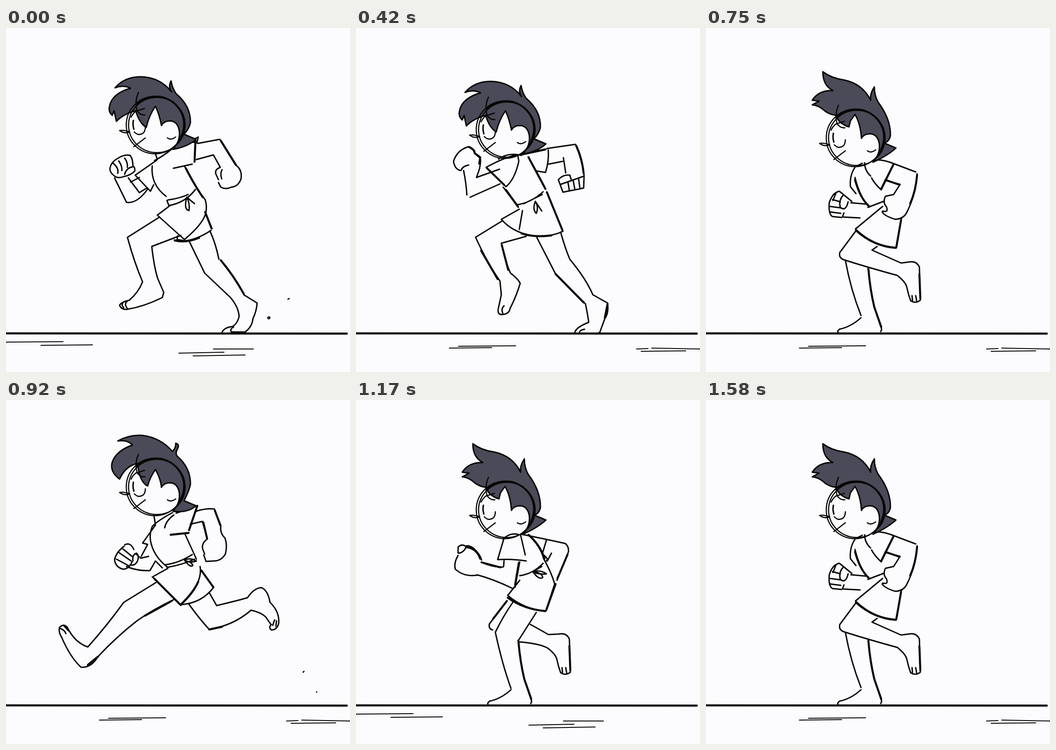
Animation, 748 px wide and 748 px high, one loop 1.68 s. Source, as an HTML page with a canvas:

```html
<!DOCTYPE html>
<html>
<head>
<meta charset="utf-8">
<title>Run cycle</title>
<style>
html, body { margin: 0; height: 100%; overflow: hidden; background: #fcfcff; }
canvas { display: block; }
</style>
</head>
<body>
<canvas id="stage" width="748" height="748"></canvas>
<script>
const ctx = document.getElementById('stage').getContext('2d');
const PAPER = '#fcfcff', INK = '#060705', HAIR = '#4b4a58';

// Head, drawn at the push-off height and shifted vertically per pose
const hairBack = tailY => `Q402 170 401 206Q398 220 387 ${tailY - 11}L413 ${tailY}Q396 ${tailY + 16} 363 264Q379 246 377 225Q374 203 357 202Q343 202 338 212Z`;
const tailY = { push: 242, flight: 252, contact: 242, passing: 233 };
const hair = {
  push: 'M338 212Q334 190 325 170Q311 190 305 216Q290 207 282 180Q255 187 240 203L235 180L231 190Q222 182 225 170Q231 142 271 131Q255 123 237 130Q258 106 293 106Q335 107 360 139Q352 128 359 115Q361 130 370 143',
  flight: 'M338 212Q337 195 325 173Q313 190 308 209Q290 200 286 160Q260 165 247 194Q225 178 231 157Q240 132 275 120Q265 108 243 111Q268 97 297 99Q336 104 362 134Q370 125 369 116Q377 118 374 126Q367 138 372 144',
  contact: 'M338 212Q336 190 324 163Q313 175 309 199Q290 185 283 153Q258 154 240 173Q222 156 231 136Q243 111 279 111Q265 100 244 101Q265 91 295 92Q335 98 361 130Q356 115 365 103Q365 120 372 135',
  passing: 'M338 212Q336 180 324 160L314 174L311 187Q288 180 283 162Q268 160 258 152Q245 140 231 139L246 131L231 129Q245 107 276 108Q254 97 254 67Q272 81 300 85Q340 93 358 129Q356 115 366 100Q366 118 374 133'
};
const face = 'M247 223Q256 221 269 226Q258 231 247 223M279 226Q288 236 299 228Q303 223 303 215M278 258L303 239M272 194Q275 187 282 181L301 175M288 140Q279 160 285 180Q292 190 302 189M351 239Q358 245 369 237';

const legs = {
  pushA: {
    line: 'M334 411L266 454M264 455Q279 510 297 552Q288 575 268 592Q250 596 247 603Q250 612 262 612Q300 606 340 586L343 575L330 545Q322 520 317 475L380 451M263 595Q256 600 264 610M254 598Q250 603 256 608M399 465L432 533L487 585Q505 605 507 627Q503 643 493 649Q475 651 470 661M495 650Q486 655 490 661L520 661Q535 650 537 632Q545 615 546 598L517 580M443 441Q455 465 463 503',
    bold: 'M467 505Q494 537 517 578'
  },
  flight: {
    line: 'M326 397L256 440Q220 490 178 537Q150 528 133 494Q125 485 116 495Q114 505 121 516Q140 560 163 581Q185 583 200 558Q240 515 285 480Q320 455 367 433M118 497Q128 500 130 508M125 490L136 502M442 419L458 447Q500 437 525 430Q540 408 556 408Q570 415 574 440Q595 460 593 485Q590 500 577 500Q570 495 577 488M397 443Q420 475 442 499Q495 490 533 457Q555 462 565 472L576 488M580 490L584 478M587 492L588 480',
    bold: 'M178 576L200 558M302 469L360 437M442 499L470 493'
  },
  contactA: {
    line: 'M316 417L215 545L190 573Q165 565 152 552Q140 537 130 544Q127 555 140 570Q165 605 192 628Q203 625 208 610L360 450M136 546L140 552M143 545L148 554M428 429L440 466L516 449Q530 428 546 427Q560 435 566 450L596 488Q597 503 588 506Q575 498 558 486Q540 480 523 479Q470 510 422 523L381 456M585 490L588 497',
    bold: 'M428 429L440 464M191 572L212 546M205 616L216 599M566 450L590 483'
  },
  contactB: {
    line: 'M310 427L215 545L190 573Q165 565 152 552Q140 537 130 544Q127 555 140 570Q165 605 192 629M204 622L215 602L356 455M136 546L140 552M143 545L148 554M434 436L446 469L510 445Q525 425 540 424Q552 430 560 445L598 483Q600 497 590 502Q575 490 562 480L522 471L468 508Q440 530 430 532L384 460M585 488L590 495',
    bold: 'M384 460L426 525M191 572L212 546M430 531L466 509'
  },
  down: {
    line: 'M318 442Q280 490 258 520Q245 570 232 625Q210 645 190 652L188 661M272 661Q278 650 275 635Q290 570 305 535L362 475M425 452L432 480Q470 490 495 490Q520 475 530 482L555 560Q550 572 540 568L520 525Q500 520 490 523Q430 540 385 535L372 478M544 566L546 555',
    bold: 'M530 484L553 552'
  },
  passA: {
    line: 'M341 440Q320 470 303 505Q318 575 337 627M337 630Q315 650 290 655Q285 660 287 661M392 462L353 523Q357 570 366 607L382 655L380 660M328 437L290 487Q288 498 297 500M379 488Q405 502 418 510L440 509Q458 505 464 520L466 590M356 526Q400 530 416 539Q435 553 437 565Q440 580 445 593Q455 600 466 592M449 593L448 582M458 593L456 582',
    bold: 'M353 523Q357 570 366 607L381 650M328 437L298 476M464 535L466 588'
  },
  passB: {
    line: 'M303 505Q315 570 337 625M337 630Q315 650 290 655Q285 660 287 661M353 523Q357 570 366 607L382 655L380 660M326 441L291 488Q288 500 300 504Q350 520 416 538Q435 553 437 565Q440 580 445 593Q455 600 466 592M372 475L361 483L424 511L440 509Q458 505 464 520L466 590M449 593L448 582M458 593L456 582',
    bold: 'M353 523Q357 570 366 607L381 650M464 535L466 588'
  },
  pushB: {
    line: 'M317 420L260 455Q285 510 313 550L316 580L309 612Q308 624 318 623Q333 622 335 610Q350 580 357 555Q352 545 336 533Q325 510 316 468L370 453M319 620Q315 610 322 604M393 455L433 533L499 600Q505 630 506 640Q480 650 476 661M497 655Q486 657 486 662M445 444Q455 480 465 503Q500 545 515 580L547 598Q550 620 541 632L530 662L522 665',
    bold: 'M317 472L331 526M272 484L308 546M434 535L495 597M547 600L541 630'
  }
};

const body = {
  pushA: {
    line: 'M325 273L329 286M362 262Q340 280 323 288M318 300Q314 340 348 366M327 288L281 320L314 355L321 341M236 326L262 379Q285 383 309 349M266 326L290 358L306 348M271 335L290 325M239 324Q225 315 226 305Q228 292 242 284Q258 274 270 277Q276 285 276 300Q281 303 280 311Q272 320 256 323Q248 327 239 324M233 294Q246 305 243 316M245 289Q253 300 252 310M258 283Q265 292 264 303M258 318Q262 304 275 302M380 251L411 248M412 240L418 237L415 250M364 305L405 296M417 251L465 242L502 300Q514 310 511 328Q505 345 490 346Q478 352 467 346L462 336M414 286L451 276L466 303Q452 308 457 319L462 330M470 308Q465 315 469 328M389 302Q410 345 433 373Q437 385 435 400Q430 425 388 460M329 407L388 460M329 407L358 385M350 375L354 386Q390 380 412 351M352 374Q380 370 396 362M393 368Q386 395 398 397Q400 380 393 368L410 382M433 400L448 436M366 461Q400 470 446 440M373 452L372 460L385 462',
    bold: 'M412 242L410 291M391 305Q412 345 428 368M433 400L447 436M367 462Q392 468 420 456M467 245L500 298'
  },
  flight: {
    line: 'M322 253L325 272L297 311L308 314L294 340M257 318Q240 330 236 347Q238 364 255 368Q268 367 274 352M258 315Q270 308 278 325M246 332L272 350M240 346L266 360M252 322L274 340M276 350Q274 336 284 333Q290 340 286 350Q280 362 270 358M283 335L293 344L310 340M262 362Q285 372 313 371L325 350M318 275Q312 290 314 305Q320 340 352 364M362 245Q330 262 318 275M345 278Q348 262 365 250M370 246L410 232M358 293L397 289M413 242Q435 235 453 237Q460 255 467 273Q465 290 476 300Q482 315 477 335Q468 350 452 350L435 351L430 337M401 270L427 264L438 302Q424 312 428 325L432 335M389 291L414 346M422 362Q425 375 418 395Q408 420 380 445M320 386L380 446M318 385L352 366M325 350L340 365M347 358Q375 355 405 336M350 364Q385 358 410 346M388 348Q400 342 414 350Q400 355 388 348Q400 365 406 360Q405 352 390 350M425 370L451 408Q425 442 380 445',
    bold: 'M416 230L398 283M358 293L397 289M425 371L451 407M418 395Q408 418 382 443M454 240L466 272M429 266L437 300M322 388L380 446'
  },
  contactA: {
    line: 'M322 265L324 277M326 272Q308 290 308 320Q315 350 328 384M336 299Q330 275 345 265Q375 260 412 268L375 317L345 300M411 268L399 289M378 316L406 328M400 289L444 318L413 383M407 325L386 360L366 364Q354 378 355 395Q362 407 375 410Q395 415 405 405L412 385M337 381Q370 372 388 347M385 320L392 345M300 397L330 385L353 379M298 398L362 455M405 408L365 448M415 384L441 407Q420 440 370 458M292 376Q300 363 320 364L325 370L327 382M300 372L315 372L315 390M292 376Q290 385 300 388L313 386M297 390L303 398',
    bold: 'M309 298Q306 312 312 325M443 320L414 380M400 289L420 302M405 408L389 432M315 413L352 448M418 386L440 407'
  },
  passA: {
    line: 'M360 292Q410 302 455 312Q463 318 462 330L437 392M414 305L405 335Q420 345 414 350M425 333L416 350M375 293Q400 315 408 345Q425 375 432 400L413 458M322 300L308 347Q340 345 370 350M358 294L368 337M320 303Q333 288 352 292M356 352L346 407M322 348L321 362M273 353Q300 365 320 363M263 380Q300 390 341 410M273 348Q270 335 255 322Q245 315 238 318Q230 312 222 320L222 333Q233 333 239 321M222 338Q212 355 216 368Q235 385 263 381M356 382Q385 378 407 355M385 373L404 362M385 374Q400 368 414 378Q400 380 385 374Q398 392 406 386Q405 377 390 374M330 425L356 392M330 425Q365 455 412 459',
    bold: 'M375 293Q400 315 410 345M434 400L414 456M330 430Q365 455 412 459M460 336L438 388M354 354L346 402M240 320Q262 322 270 345M273 353L314 364'
  },
  pushB: {
    line: 'M415 262L477 253Q492 285 496 321M419 296L449 290M451 282L456 315M418 265Q420 290 412 314L393 311M440 330Q450 318 465 320L468 330M440 330L450 357L495 348L496 322L445 340M461 336L464 354M472 330L476 352M484 327L487 350M283 303L326 345Q345 330 354 290L352 278M283 303Q325 280 350 276M262 325L312 307M248 368L313 339M234 310Q240 340 241 363M262 325L269 305M269 303Q272 290 270 280L258 272Q252 258 245 258Q220 265 212 290Q215 308 228 310Q232 300 245 298M310 285Q330 270 360 277M375 280L410 345M415 357L450 442M320 346L353 390M352 384Q380 380 407 356M365 382L405 362M390 377Q383 395 392 403Q398 390 390 377L404 398M316 416L355 394M316 416Q345 450 400 453Q430 452 450 442M362 397L355 438',
    bold: 'M375 281L412 350M415 357L449 440M479 256Q492 285 495 316M285 305L322 341M360 447Q390 456 425 451M326 352L352 388M360 275L412 264M246 259Q258 264 258 272L270 282L268 295'
  },
  contactB: {
    line: 'M330 268Q310 290 314 325Q318 345 330 352M328 270Q332 290 317 327M317 328L369 325M336 330L339 352M330 270Q345 263 360 268L377 322M366 270L400 346M360 266L400 293L390 308M400 297Q430 312 434 325Q425 345 413 357M371 324L379 377M313 361L341 354M314 400L378 378M313 361Q300 350 280 354Q262 360 262 372M266 382Q266 400 276 406Q295 412 315 398M381 360Q385 345 398 349Q390 355 381 360L405 350M404 350L423 374M428 379L465 401Q430 450 375 457M354 400L373 456M298 412Q325 445 358 454L366 443M298 410L318 402',
    bold: 'M358 270L377 320M314 292Q310 308 315 320M318 328L366 326M371 328L378 374M300 414Q325 442 356 454M404 350L422 372M270 357L300 354'
  },
  passB: {
    line: 'M324 303Q312 320 314 345L326 360M328 300L340 294M324 325Q335 370 356 389M345 293Q345 310 358 322M365 287Q385 285 411 296L456 313M407 298L381 352Q366 338 360 326M459 317Q455 365 437 400Q430 415 412 416Q390 410 383 400M384 398Q398 402 392 388Q384 380 390 366L408 362L422 340L389 331M268 380Q275 358 290 355L317 377M268 380Q266 405 275 410L295 412M283 358L276 375M275 373L292 378M270 388L292 391M270 400L293 403M298 364Q288 375 292 390Q304 400 309 378M315 380L349 383M298 411L335 413M300 402L297 410M352 390L386 377M384 388L325 437Q365 475 413 478L425 415',
    bold: 'M407 298L381 350M326 440Q365 475 413 478M459 320Q456 355 444 382M424 418L414 476M324 330Q335 370 354 387M392 331L421 341'
  }
};

// One full stride: [head shift, hair, legs, body, body shift, dust]
const stride = [
  [0, 'push', 'pushA', 'pushA', 0, 'M569 630Q573 626 574 630Q571 635 569 630M613 590L616 588'],
  [-22, 'flight', 'flight', 'flight', 0, 'M646 592L648 590M675 635L676 635'],
  [-7, 'contact', 'contactA', 'contactA', 0, ''],
  [20, 'passing', 'down', 'contactA', 25, ''],
  [28, 'passing', 'passA', 'passA', 0, ''],
  [10, 'push', 'pushB', 'pushB', 0, ''],
  [-12, 'flight', 'flight', 'pushB', -20, ''],
  [-5, 'contact', 'contactB', 'contactB', 0, 'M467 660L484 661M629 653L630 653'],
  [20, 'passing', 'down', 'contactB', 24, ''],
  [28, 'passing', 'passB', 'passB', 0, '']
];
const dashes = [
  'M0 683L124 682M76 690L188 689M376 707L474 705M451 698L538 698M407 713L520 711',
  'M203 696L295 695M223 692L347 691M610 698L635 697M643 696L748 698M620 703L717 702'
];

const LOOP = 1680;
const starts = Array.from({ length: 20 }, (_, i) => 10 * Math.round(i * 25 / 3));

function stroke(path, width) {
  ctx.lineWidth = width;
  ctx.stroke(new Path2D(path));
}

function drawPart({ line, bold }, dy = 0) {
  ctx.save();
  ctx.translate(0, dy);
  stroke(line, 3);
  stroke(bold, 4.4);
  ctx.restore();
}

function ellipse(x, y, rx, ry, width) {
  ctx.lineWidth = width;
  ctx.beginPath();
  ctx.ellipse(x, y, rx, ry, 0, 0, 2 * Math.PI);
  ctx.stroke();
}

function drawHead(dy, style) {
  const shape = hair[style] + hairBack(tailY[style]);
  ctx.save();
  ctx.translate(0, dy);
  ctx.fillStyle = HAIR;
  ctx.fill(new Path2D(shape));
  stroke(shape, 3);
  ellipse(324, 211, 62.5, 62.5, 2.5);
  ellipse(328, 211, 61.5, 60, 2.5);
  stroke('M283 166Q310 145 340 150Q378 162 387 198Q389 220 379 240', 3.6);
  stroke(face, 2.6);
  stroke('M277 201Q275 210 278 220', 3.2);
  ctx.restore();
}

function draw(time) {
  const t = time % LOOP;
  const step = starts.findLastIndex(s => s <= t);
  const [headY, style, leg, torso, torsoY, dust] = stride[step % 10];
  ctx.fillStyle = PAPER;
  ctx.fillRect(0, 0, 748, 748);
  ctx.strokeStyle = INK;
  ctx.lineCap = ctx.lineJoin = 'round';
  stroke('M-4 664L741 664.5', 4.6);
  stroke(dashes[step % 2], 2.1);
  drawPart(legs[leg]);
  drawPart(body[torso], torsoY);
  drawHead(headY, style);
  stroke(dust, 2.6);
}

const begin = performance.now();
function tick() {
  draw(performance.now() - begin);
  requestAnimationFrame(tick);
}
tick();
</script>
</body>
</html>
```
